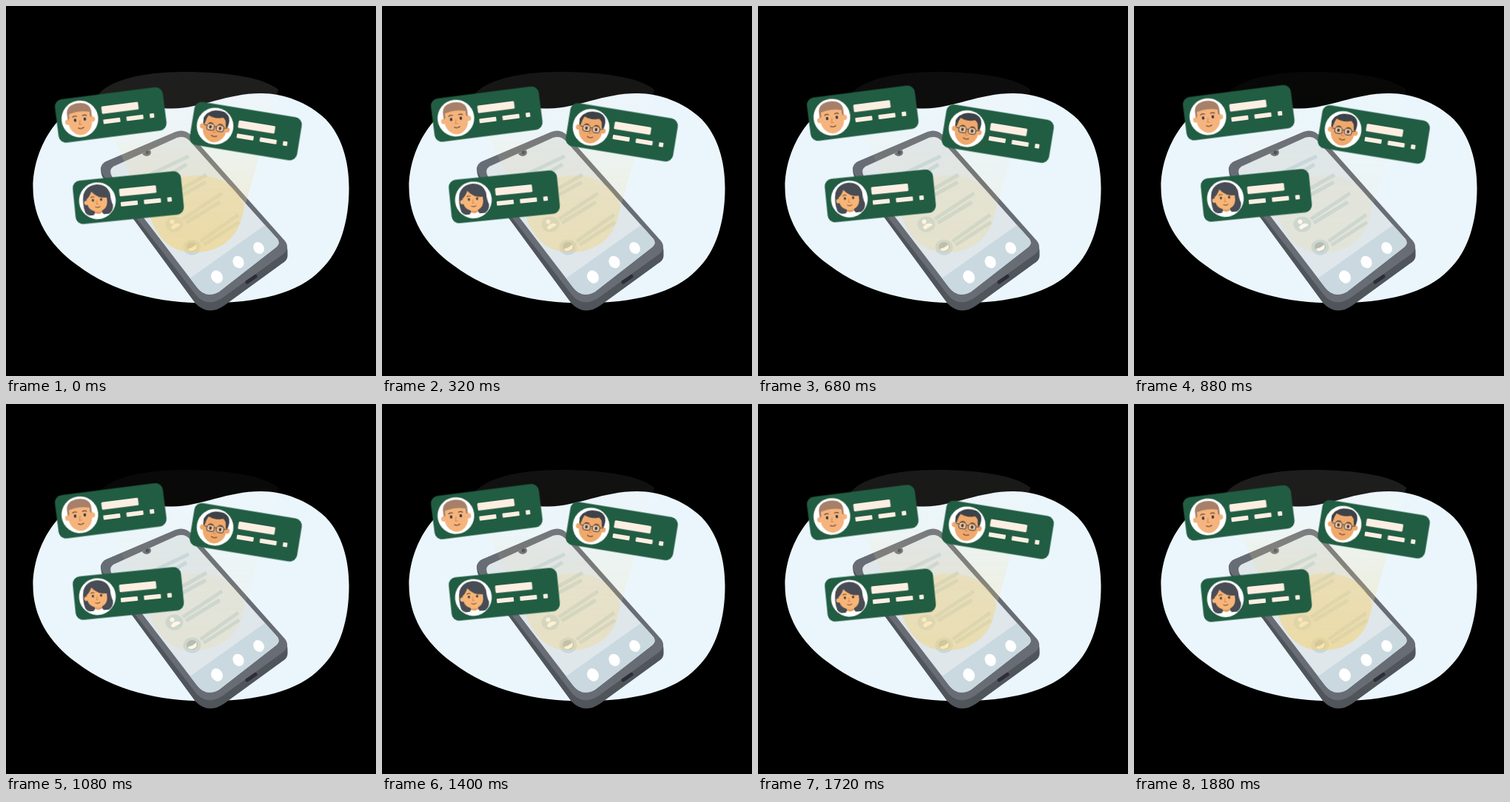
Write an HTML page that moves like this. It is 500 by 500 pixels and loops after 1.92 s.

```html
<!DOCTYPE html>
<html lang="en">
<head>
<meta charset="utf-8">
<title>Contact cards above a phone</title>
<style>
  html, body { margin: 0; width: 100%; height: 100%; overflow: hidden; background: #000; }
  svg { display: block; width: 100vw; height: 100vh; }
  .rise, .sink, .beam { animation: rise 1920ms linear infinite; }
  .sink { animation-name: sink; }
  .beam { animation-name: glow; }
  @keyframes rise { 50% { transform: translateY(-3.4px); } }
  @keyframes sink { 50% { transform: translateY(5px); } }
  @keyframes glow { 50% { opacity: .2; } }
  .line { fill: none; stroke-linecap: round; stroke-linejoin: round; }
</style>
</head>
<body>
<svg viewBox="0 0 500 500">
  <defs>
    <linearGradient id="light" gradientUnits="userSpaceOnUse" x1="0" y1="89" x2="0" y2="332">
      <stop offset="0" stop-color="#f8fafc" stop-opacity=".125"/>
      <stop offset=".3" stop-color="#fbf0d6" stop-opacity=".125"/>
      <stop offset=".45" stop-color="#f5dea0" stop-opacity=".18"/>
      <stop offset="1" stop-color="#f3d580" stop-opacity=".4"/>
    </linearGradient>
    <path id="screen" d="M147 216L231 178Q241 174.500 248 182L367 315Q371 321 365 326L288 386Q270 396 258 380L143 230Q138 220 147 216Z"/>
    <clipPath id="glass"><use href="#screen"/></clipPath>
    <g id="card">
      <rect x="-73.5" y="-29.5" width="147" height="59" rx="10" fill="#215d43"/>
      <circle cx="-42" r="24.8" fill="#fff"/>
      <g fill="#fdeee2">
        <rect x="-11.4" y="-13" width="50" height="10.2" rx="1.5"/>
        <rect x="-11" y="5" width="23" height="6" rx="1"/>
        <rect x="20.5" y="5" width="23" height="6" rx="1"/>
        <rect x="52.2" y="5" width="6" height="6" rx="1"/>
      </g>
    </g>
    <g id="bust">
      <circle cx="-17" cy="2.5" r="3.4"/>
      <circle cx="17" cy="2.5" r="3.4"/>
      <path d="M-16-9Q-15-18 0-18T16-9V5Q15 15 7 20Q0 24-7 20Q-15 15-16 5Z"/>
    </g>
    <g id="features">
      <g fill="#3d3f45">
        <ellipse cx="-6.6" cy="1" rx="1.8" ry="2.3"/>
        <ellipse cx="6.6" cy="1" rx="1.8" ry="2.3"/>
      </g>
      <path class="line" d="M-9.5-3.5Q-7-5.5-4-4M4-4Q7-5.5 9.5-3.5M-3.5 12Q0 14.500 3.8 12" stroke="#6b4632" stroke-width="1.2"/>
      <path class="line" d="M0 2L-1.5 7.5H1.5" stroke="#d98952" stroke-width="1.2"/>
    </g>
  </defs>

  <path fill="#ebf6fc" d="M36.500 245C36.500 190 75 126 132 125C172 124 190 139 225 138.500C265 138 298 118 345 118C375 118 408 130 432 153C454 176 463.500 210 463.500 246C463.500 290 452 332 425 357C396 388 340 401.500 270 401.500C210 401.500 145 388 96 350C57 322 36.500 286 36.500 245Z"/>

  <path fill="#50555b" d="M128 218L249 177L378 321Q380.500 325 380.500 333V338Q380 344 373 348L296 404Q274 420 256 402L131 232Q128 228 128 218Z"/>
  <path fill="#686d75" d="M135 210L229 170Q241 165.500 250 174.500L377 317.500Q384 327 375 335L293 394Q272 408 257 391L131 228Q124 216 135 210Z"/>
  <path class="line" d="M326 373L337 365.500" stroke="#2b2f34" stroke-width="5"/>
  <use href="#screen" fill="#dfe7eb"/>
  <g clip-path="url(#glass)">
    <path fill="#c9d9df" d="M240 374L350 296L400 320L280 420Z"/>
    <ellipse cx="190" cy="198" rx="6" ry="5" fill="#686d75"/>
  </g>
  <circle cx="191" cy="198" r="2.4" fill="#454a51"/>
  <g fill="#fff">
    <ellipse rx="7.6" ry="9" transform="translate(285 366) rotate(-30)"/>
    <ellipse rx="7.3" ry="8.6" transform="translate(314 346) rotate(-30)"/>
    <ellipse rx="7" ry="8.4" transform="translate(341.5 327) rotate(-30)"/>
  </g>
  <path fill="none" stroke="#c6d7de" stroke-width="5" d="M194 228L247 203M207 236L244 214M222 256L271 228M230 260L270 238M239 288L292 253M243 293L289 265M263 318L314 282M267 323L315 292"/>
  <ellipse cx="227.5" cy="295" rx="12" ry="10.5" fill="#c6d7de"/>
  <circle cx="224.5" cy="291.5" r="3" fill="#fff"/>
  <path fill="#fff" d="M223 300Q224 295 230 294Q234 293 236 296L226 302Z"/>
  <ellipse cx="251.5" cy="326" rx="12" ry="10.5" fill="#c6d7de"/>
  <ellipse cx="251.5" cy="325.5" rx="7.5" ry="6.5" fill="#a9b7bd"/>
  <path fill="#fff" d="M246 328Q253 327 257 322Q260 329 252 331Q247 332 246 328Z"/>

  <g class="beam">
    <path fill="url(#light)" d="M123 122C138 100 185 89 240 89C305 89 350 98 368 113Q367 118 365 124L319 284C313 315 287 333 254 333C222 333 205 312 196 289L128 141Z"/>
    <path fill="#f3d27a" fill-opacity=".38" d="M191 275C200 247 227 229 258 229C288 229 313 242 322 272L319 284C313 315 287 333 254 333C222 333 205 312 196 289Z"/>
  </g>

  <g class="rise">
    <g transform="translate(141.5 147.3) rotate(-7.3)">
      <use href="#card"/>
      <g transform="translate(-42 0)">
        <use href="#bust" fill="#f5b47d"/>
        <path fill="#a78069" d="M-16.5 0V-10Q-15-21 0-21.5Q15-21 16.5-10V0L14-2V-8Q0-12-14-8V-2Z"/>
        <use href="#features"/>
      </g>
    </g>
  </g>

  <g class="sink">
    <g transform="translate(324 169) rotate(9.3)">
      <use href="#card"/>
      <g transform="translate(-42 0)">
        <use href="#bust" fill="#f0a96c"/>
        <path fill="#3d4248" d="M-16.5-1L-17-9Q-14-16-11-17Q-6-22 4-21.5Q13-22 17-14Q19-7 16.5 0L14.5-1L13-9Q11-12 9-13Q-1-9-11-13L-13-8L-14.5-1Z"/>
        <g transform="translate(.6 1)">
          <g fill="#fff" fill-opacity=".3" stroke="#4c5054" stroke-width="1.1">
            <rect x="-11.5" y="-3.2" width="10" height="8.6" rx="3.5"/>
            <rect x="1.5" y="-3.2" width="10" height="8.6" rx="3.5"/>
            <path fill="none" d="M-1.5 0Q0-1 1.5 0M-11.5 0L-16-1M11.5 0L16-1"/>
          </g>
          <use href="#features"/>
        </g>
      </g>
    </g>
  </g>

  <g class="rise">
    <g transform="translate(165.3 259) rotate(-5.7)">
      <use href="#card"/>
      <g transform="translate(-42 0)">
        <path fill="#484c55" d="M-18 14Q-21 2-18-10Q-13-22 1-22Q15-21 18-8Q18 2 20.500 8Q20 16 14 19H-12Q-16 18-18 14Z"/>
        <path fill="#fff" d="M-8 23.500Q-7 15 0 15T8 23Q0 26-8 23.500Z"/>
        <path fill="#e59c60" d="M-5 11H5V16Q0 20-5 16Z"/>
        <circle cx="-15" cy="1.5" r="3" fill="#f7b577"/>
        <path fill="#f7b577" d="M-14.500-3Q-10-6-7-13Q0-3 13-3V3Q12 11 5 14Q0 16-5 14Q-13 11-14 3Z"/>
        <use href="#features" transform="translate(-.4 -2) scale(.84)"/>
      </g>
    </g>
  </g>
</svg>
</body>
</html>
```
